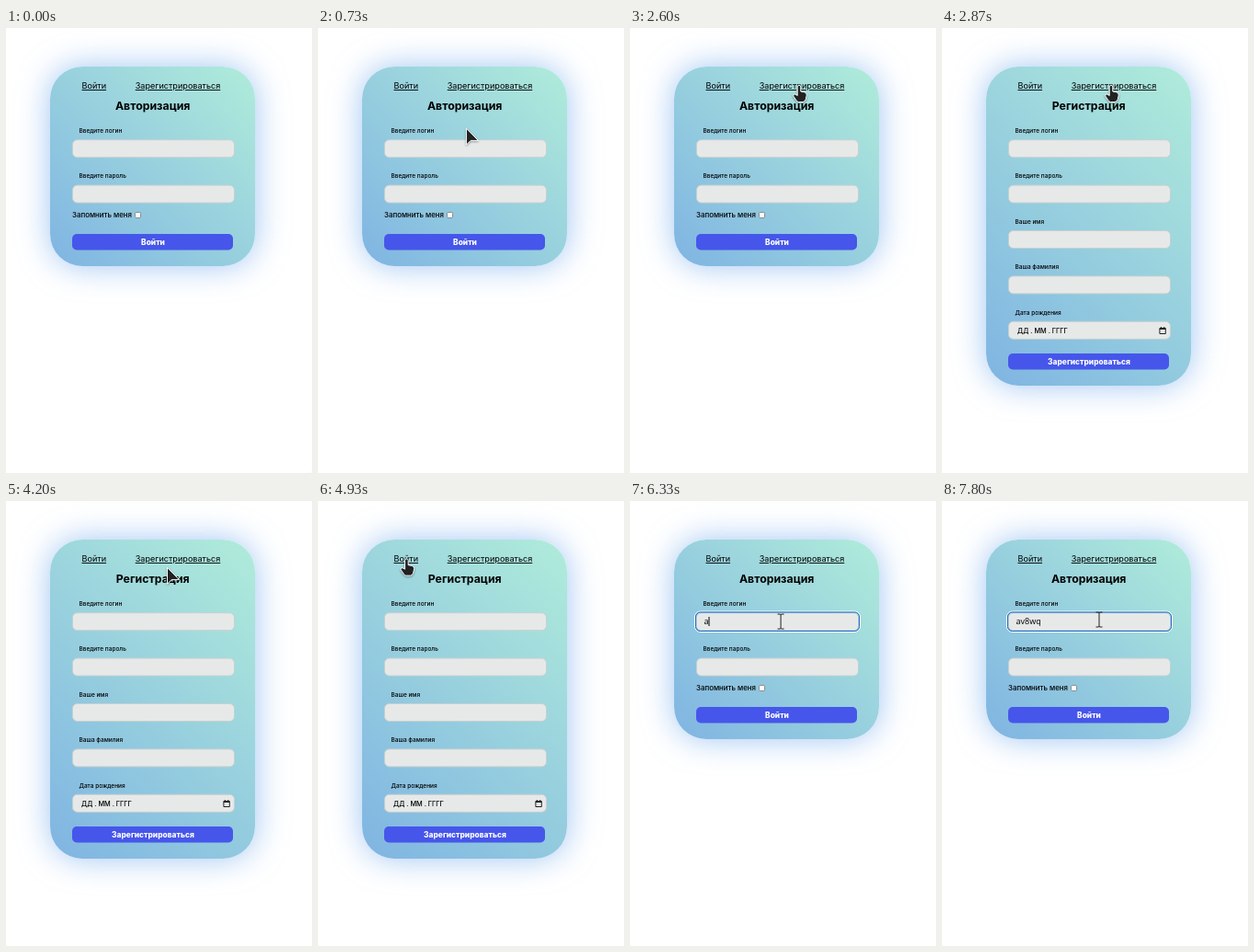
An HTML page that plays this animation: 333x484 px, repeating every 8000 ms.

```html
<!DOCTYPE html>
<html lang="ru">
<head>
<meta charset="utf-8">
<style>
  html, body { margin: 0; width: 100%; height: 100%; overflow: hidden; background: #fff; }
  #card {
    position: absolute; left: 48px; top: 42px; width: 223px; height: 217px;
    border-radius: 35px;
    background: linear-gradient(45deg, #7fb4e2, #b0ecda);
    box-shadow: 0 0 34px rgba(90, 155, 235, .58);
  }
  svg { position: absolute; left: 0; top: 0; }
  text { font-family: Inter, Roboto, sans-serif; fill: #000; }
  .mid { text-anchor: middle; }
  .link { font-size: 9.1px; text-decoration: underline; }
  .title { font-size: 12.3px; font-weight: 700; }
  .label { font-size: 6.5px; font-weight: 500; }
  .button { font-size: 8.4px; font-weight: 800; fill: #fff; }
  .sys { font-family: "Open Sans", "Noto Sans", sans-serif; }
  .field { fill: #e6e9e8; stroke: #c6d0d0; }
  .pointer { fill: #222; stroke: #fff; stroke-linejoin: round; filter: drop-shadow(.5px 1px 1px rgba(0, 0, 0, .35)); }
</style>
</head>
<body>
<div id="card"></div>
<svg width="333" height="484" viewBox="0 0 333 484">
  <text class="link mid" x="95.8" y="66">Войти</text>
  <text class="link mid" x="187" y="66">Зарегистрироваться</text>
  <text id="title" class="title mid" x="159.7" y="89"></text>
  <g id="common"></g>
  <g id="login">
    <text x="72" y="206" font-size="7.9" font-weight="500">Запомнить меня</text>
    <rect x="140.5" y="200.5" width="6" height="6" rx="1" fill="#fff" stroke="#767676" stroke-width=".8"/>
  </g>
  <g id="signup">
    <g id="extra"></g>
    <text x="82" y="332" font-size="7.3" font-weight="500">ДД . ММ . ГГГГ</text>
    <path d="M236.9 326.5h6.4v6h-6.4zM236.9 327.5h6.4M238.4 325v1.5M241.8 325v1.5" fill="none" stroke="#222"/>
  </g>
  <g id="button">
    <rect x="72" width="175" height="17.5" rx="5" fill="#4656ea"/>
    <text id="action" class="button mid" x="160" y="12"></text>
  </g>
  <g id="focus" fill="none">
    <rect x="70.5" y="120" width="180" height="22.5" rx="6" stroke="#fff"/>
    <rect x="71.5" y="121" width="178" height="20.5" rx="5" stroke="#1664c8"/>
  </g>
  <text id="typed" class="sys" x="80.5" y="134" font-size="9"></text>
  <rect id="caret" y="126" width="1" height="10"/>
  <g id="tip">
    <rect x="153.5" y="151.5" width="200" height="21" rx="2" fill="#2b2a33" stroke="#dfe2e6"/>
    <text class="sys" x="157" y="166.5" font-size="12" style="fill:#fff">Пожалуйста, заполните это поле.</text>
  </g>
  <g id="cursor">
    <path id="arrow" class="pointer" d="M0 0V18L4.7 13.3H13Z"/>
    <path id="hand" class="pointer" d="M-1.8 1.5a1.8 1.8 0 0 1 3.6 0V6.5L6 7.3Q8.5 8 8.3 10.5L7.3 15Q6.5 18 4 18H-.5Q-2 18 -3.2 16L-6.3 11.5Q-7 9.5 -4.5 9.5L-1.8 11Z"/>
    <path id="beam" d="M-3.5 -8H-1L0 -7.5L1 -8H3.5M0 -7.5V7.5M-3.5 8H-1L0 7.5L1 8H3.5" fill="none" stroke="#222"/>
  </g>
</svg>
<script>
const $ = id => document.getElementById(id);
const show = (id, on) => $(id).style.display = on ? '' : 'none';
const clamp = (v, lo, hi) => Math.min(hi, Math.max(lo, v));

const LOOP = 8000, STEP = 1000 / 15;
const USER = 'av8wq';

// Pointer hops: when each starts and ends (ms) and where it lands
const ENTRY = { x: 332, y: 483 };
const HOPS = [
  { from: 0, to: 670, x: 164, y: 103 },
  { from: 670, to: 870, x: 153, y: 129 },
  { from: 2000, to: 2600, x: 184, y: 62.5 },
  { from: 3400, to: 3930, x: 177, y: 72.5 },
  { from: 4130, to: 5000, x: 95, y: 63 },
  { from: 5400, to: 5800, x: 128, y: 142 },
  { from: 5930, to: 6470, x: 171, y: 129 }
];

const field = (label, i) => {
  const y = i * 49.4;
  return `<text class="label" x="79.5" y="${114 + y}">${label}</text>
    <rect class="field" x="72.5" y="${121.7 + y}" width="176" height="19" rx="5"/>`;
};
const fields = ['Введите логин', 'Введите пароль', 'Ваше имя', 'Ваша фамилия', 'Дата рождения'].map(field);
$('common').innerHTML = fields.slice(0, 2).join('');
$('extra').innerHTML = fields.slice(2).join('');

function pointerAt(t) {
  let { x, y } = ENTRY;
  for (const hop of HOPS) {
    const k = clamp((t - hop.from) / (hop.to - hop.from), 0, 1);
    const ease = k * k * (3 - 2 * k);
    x += (hop.x - x) * ease;
    y += (hop.y - y) * ease;
  }
  return { x, y };
}

function shapeAt({ x, y }) {
  const within = (l, t, r, b) => x >= l && x <= r && y >= t && y <= b;
  if (within(82, 57, 109, 68.5) || within(142, 57, 232, 68.5) || within(72, 224, 247, 241)) return 'hand';
  if (within(72, 122, 249, 141) || within(72, 170, 249, 191)) return 'beam';
  return 'arrow';
}

// Letters typed at a steady pace, up to max
const burst = (t, start, gap, max) => clamp(Math.floor((t - start) / gap), 0, max);

function draw(time) {
  const t = Math.round(Math.floor((time + 4) / STEP) * STEP) % LOOP;
  const signup = t >= 2860 && t < 5330;
  $('card').style.height = (signup ? 347 : 217) + 'px';
  $('title').textContent = signup ? 'Регистрация' : 'Авторизация';
  $('action').textContent = signup ? 'Зарегистрироваться' : 'Войти';
  $('button').setAttribute('transform', `translate(0 ${signup ? 354 : 224})`);
  show('signup', signup);
  show('login', !signup);
  show('tip', t >= 1400 && t < 2260);

  const focused = t >= 6130;
  show('focus', focused);
  $('typed').textContent = USER.slice(0, burst(t, 6200, 130, 2) + burst(t, 7190, 200, 3));
  $('caret').setAttribute('x', 80.5 + $('typed').getComputedTextLength());
  show('caret', focused && Math.floor((t - 6130) / 533) % 2 === 0);

  const p = pointerAt(t), shape = shapeAt(p);
  $('cursor').setAttribute('transform', `translate(${p.x} ${p.y})`);
  for (const id of ['arrow', 'hand', 'beam']) show(id, id === shape);
}

const start = performance.now();
function tick() {
  draw((performance.now() - start) % LOOP);
  requestAnimationFrame(tick);
}
tick();
</script>
</body>
</html>
```
